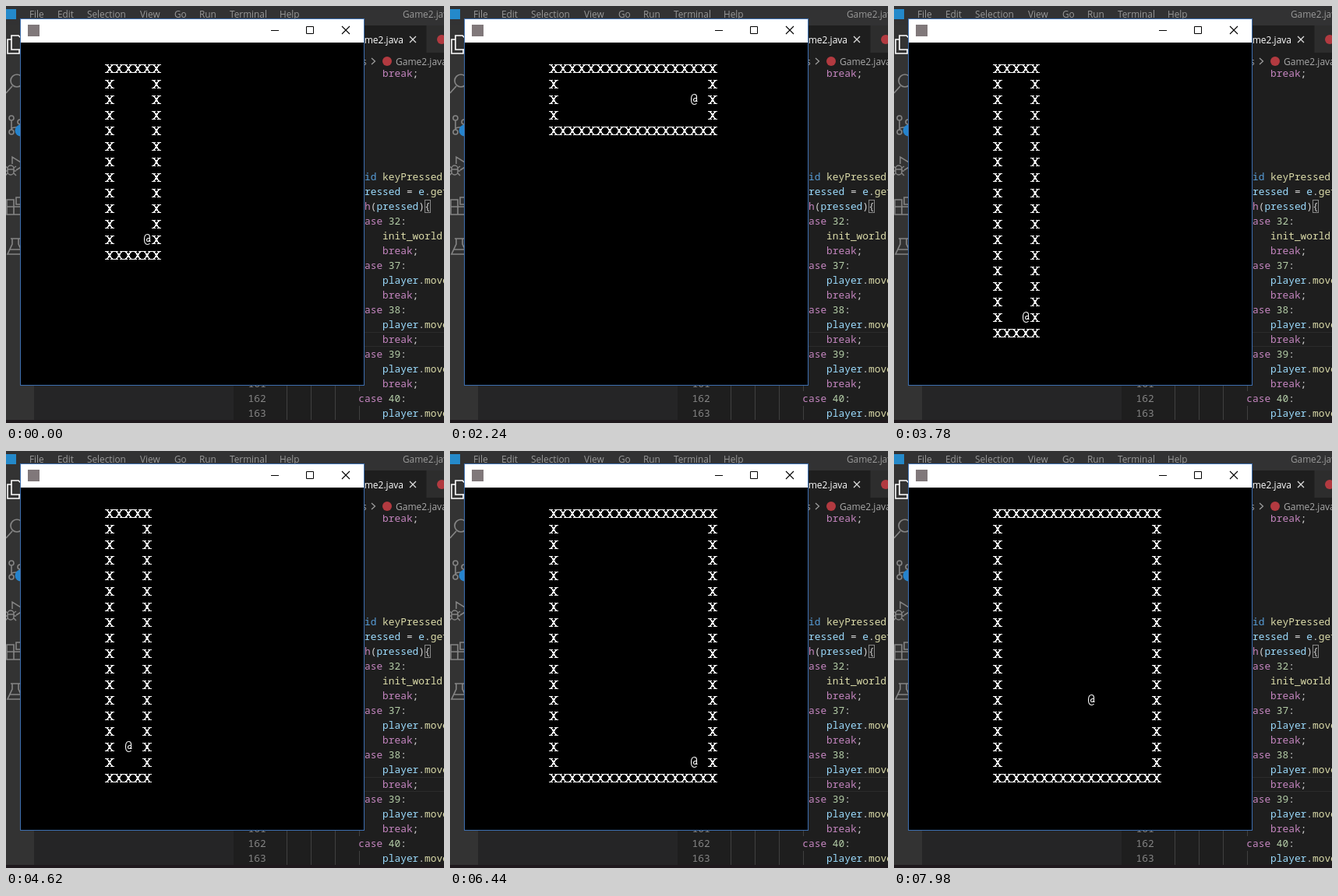
Animation, 562 px wide and 536 px high, one loop 8 s. Source, as an HTML page with a canvas:

```html
<!DOCTYPE html>
<html lang="en">
<head>
<meta charset="utf-8">
<title>Room game</title>
<style>
html, body { margin: 0; width: 100%; height: 100%; overflow: hidden; background: #1e1e1e; }
canvas { display: block; }
</style>
</head>
<body>
<canvas id="stage" width="562" height="536"></canvas>
<script>
const ctx = document.getElementById('stage').getContext('2d');
const LOOP = 8000;
const UI = '"Open Sans", "Noto Sans", sans-serif';
const MONO = '"Noto Sans Mono", "DejaVu Sans Mono", monospace';
const CHAR = 7.7;

const C = {
  key: '#c586c0', num: '#b5cea8', fn: '#dcdcaa',
  name: '#9cdcfe', type: '#569cd6', text: '#d4d4d4'
};

// Each step either builds a new room [w, h] or moves the player by letters.
const steps = [
  [0, [6, 13]], [560, 'U'], [700, 'L'], [840, 'U'], [1120, 'L'], [1400, 'U'], [1540, 'U'],
  [1820, [18, 5]], [2240, 'LU'], [2380, 'L'], [2520, 'LU'], [2800, 'L'], [3220, 'L'], [3360, 'D'],
  [3780, [5, 18]], [4340, 'U'], [4620, 'L'], [4760, 'U'], [5040, 'U'],
  [5180, [18, 18]], [6440, 'L'], [6580, 'U'], [6860, 'L'], [7000, 'U'], [7140, 'L'],
  [7420, 'LU'], [7700, 'LU'], [7980, 'L']
];

function stateAt(t) {
  let w, h, x, y;
  for (const [at, act] of steps) {
    if (at > t) break;
    if (Array.isArray(act)) {
      [w, h] = act;
      x = w - 2;
      y = h - 2;
    } else {
      for (const k of act) {
        x += (k === 'R') - (k === 'L');
        y += (k === 'D') - (k === 'U');
      }
    }
  }
  return { w, h, x, y };
}

function rect(x, y, w, h, color) {
  ctx.fillStyle = color;
  ctx.fillRect(x, y, w, h);
}

function disc(x, y, r, color) {
  ctx.fillStyle = color;
  ctx.beginPath();
  ctx.arc(x, y, r, 0, 7);
  ctx.fill();
}

function stroke(d, color, width = 1) {
  ctx.strokeStyle = color;
  ctx.lineWidth = width;
  ctx.stroke(new Path2D(d));
}

function label(s, x, y, color, size = 11.8) {
  ctx.font = `${size}px ${UI}`;
  ctx.fillStyle = color;
  ctx.fillText(s, x, y + 4.5);
}

// Code line: alternating text and colour, starting at a character column.
function code(col, y, ...parts) {
  ctx.font = `12.83px ${MONO}`;
  let x = 390.7 + col * CHAR;
  for (let i = 0; i < parts.length; i += 2) {
    ctx.fillStyle = parts[i + 1];
    ctx.fillText(parts[i], x, y + 5);
    x += parts[i].length * CHAR;
  }
}

function drawMenu() {
  rect(0, 0, 562, 25, '#323233');
  rect(0, 4, 13, 13, '#2489ca');
  const items = { File: 30, Edit: 66, Selection: 104, View: 172, Go: 216, Run: 248, Terminal: 287, Help: 351 };
  for (const s in items) label(s, items[s], 10, '#999999');
  label('Game2.java', 509, 10, '#999999');
}

function drawSidebar() {
  rect(0, 25, 36, 511, '#333333');
  rect(36, 25, 256, 511, '#252526');
  const gray = '#858585';
  stroke('M7 38H16L23 45V56H7ZM7 43H2V61H17V56', '#ffffff', 1.6);
  stroke('M6 96a8 8 0 1 0 16 0a8 8 0 1 0 -16 0M8 103L0 112', gray, 1.7);
  stroke('M4 144a3 3 0 1 0 6 0a3 3 0 1 0 -6 0M4 162a3 3 0 1 0 6 0a3 3 0 1 0 -6 0' +
    'M15 149a3 3 0 1 0 6 0a3 3 0 1 0 -6 0M7 147V159M18 152Q18 156 12 156Q7 156 7 159', gray, 1.6);
  disc(19, 160, 7.5, '#2583cc');
  stroke('M8 203V194L24 204L13 211M2 209a4 4 0 0 1 8 0v4a4 4 0 0 1 -8 0ZM2 210H10' +
    'M-1 206L2 208M13 206L10 208M-1 212H2M10 212H13M-1 218L2 215M13 218L10 215', gray, 1.5);
  stroke('M1 249H10V258H19V268H1ZM1 258H10V268M13 246H22V255H13Z', gray, 1.6);
  stroke('M6 299H18M8 299V306L2 319H22L16 306V299M5 313H19', gray, 1.6);
}

function drawCode() {
  rect(292, 25, 270, 511, '#1e1e1e');
  rect(460, 419, 102, 1, '#2b2b2b');
  rect(460, 437, 102, 1, '#2b2b2b');

  ctx.save();
  ctx.beginPath();
  ctx.rect(292, 82, 270, 454);
  ctx.clip();
  code(12, 86, 'break', C.key, ';', C.text);
  code(7, 219, 'void', C.type, ' ', C.text, 'keyPressed', C.fn, '(', C.text);
  code(4, 238, 'int', C.type, ' ', C.text, 'pressed', C.name, ' = ', C.text,
    'e', C.name, '.', C.text, 'getKeyCode', C.fn);
  code(4, 257, 'switch', C.key, '(', C.text, 'pressed', C.name, '){', C.text);
  ctx.strokeStyle = '#888888';
  ctx.lineWidth = 1;
  ctx.strokeRect(537.5, 249.5, 7, 16);
  for (let i = 0; i < 5; i++) {
    const y = 276 + i * 57;
    const top = i ? y : 276;
    code(8, top, 'case', C.key, ' ', C.text, i ? String(36 + i) : '32', C.num, ':', C.text);
    if (i) code(12, y + 19, 'player', C.name, '.', C.text, 'move', C.fn, '(', C.text);
    else code(12, y + 19, 'init_world', C.fn, '(', C.text);
    if (i < 4) code(12, y + 38, 'break', C.key, ';', C.text);
  }
  ctx.restore();

  for (let i = 0; i < 4; i++) {
    rect(360 + i * 31, 488, 1, i < 3 ? 44 : 7, '#404040');
  }
  rect(453, 514, 1, 18, '#404040');
  for (let n = 161; n < 164; n++) code(-10.4, 485 + (n - 161) * 19, String(n), '#858585');
}

function drawTabs() {
  rect(460, 25, 102, 35, '#252526');
  rect(460, 25, 79, 35, '#1e1e1e');
  rect(540, 25, 22, 35, '#2d2d2d');
  ctx.textAlign = 'right';
  label('Game2.java', 510, 43, '#ffffff', 12);
  ctx.textAlign = 'left';
  stroke('M518 39L526 47M526 39L518 47', '#e0e0e0', 1.2);
  disc(559, 43, 6, '#b23a40');

  label('s', 457, 71, '#a0a0a0', 12);
  stroke('M469 67L473.5 71L469 75', '#a0a0a0', 1.2);
  disc(489, 71, 6, '#b23a40');
  label('Game2.java', 500, 71, '#a9a9a9', 12);
}

function drawWindow() {
  rect(18, 16, 442, 472, '#3d6fb0');
  rect(19, 17, 440, 30, '#ffffff');
  rect(19, 47, 440, 440, '#000000');
  rect(28, 24, 15, 15, '#80787a');
  rect(340, 31, 10, 1, '#000000');
  stroke('M385.5 26.5H394.5V35.5H385.5Z', '#000000');
  stroke('M431 26L441 36M441 26L431 36', '#000000', 1.1);
}

// Slab-serif X built from pixel rows.
function drawWall(col, row) {
  const x = 127 + col * 12, y = 75 + row * 20;
  for (const dy of [0, 10]) {
    rect(x, y + dy, 5, 1, '#ffffff');
    rect(x + 7, y + dy, 5, 1, '#ffffff');
  }
  for (let i = 0; i < 11; i++) {
    const d = Math.round(Math.abs(i - 5) * 0.68);
    rect(x + 5 - d, y + i, 2, 1, '#ffffff');
    rect(x + 5 + d, y + i, 2, 1, '#ffffff');
  }
}

function drawPlayer(col, row) {
  ctx.save();
  ctx.translate(133 + col * 12, 80 + row * 20);
  stroke('M3.5 5Q2.5 6.5 0.5 6.5C-2.5 6.5 -3.5 4 -3.5 0C-3.5 -4 -2.5 -6.5 0.5 -6.5' +
    'C2.5 -6.5 3.5 -5 3.5 -3V2.5H4.5M3.5 -1.5H2Q-0.5 -1.5 -0.5 1Q-0.5 2.5 1 2.5Q3 2.5 3.5 1', '#ffffff', 1.1);
  ctx.restore();
}

function drawRoom({ w, h, x, y }) {
  for (let r = 0; r < h; r++) {
    const edge = r === 0 || r === h - 1;
    for (let c = 0; c < w; c += edge ? 1 : w - 1) drawWall(c, r);
  }
  drawPlayer(x, y);
}

function frame(now) {
  drawSidebar();
  drawCode();
  drawTabs();
  drawMenu();
  rect(0, 532, 562, 4, '#1f191d');
  drawWindow();
  drawRoom(stateAt(now % LOOP));
}

const start = performance.now();
function tick() {
  frame(performance.now() - start);
  requestAnimationFrame(tick);
}
tick();
</script>
</body>
</html>
```
